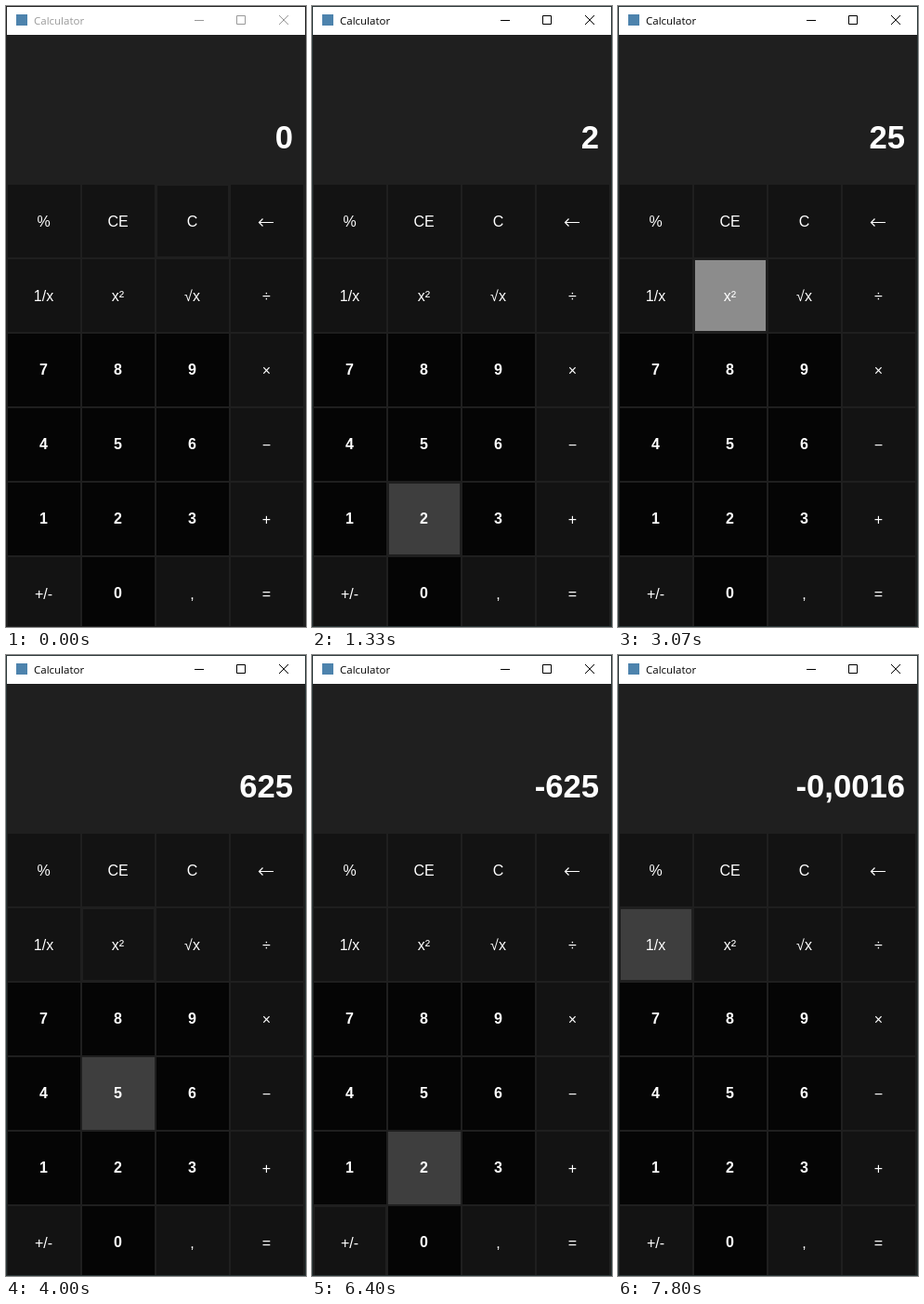
Recreate the animation shown at these times as an HTML page with a canvas. Size 323 px wide and 667 px high, loop 8 s.

```html
<!DOCTYPE html>
<html lang="en">
<head>
<meta charset="utf-8">
<title>Calculator</title>
<style>
  html, body { margin: 0; width: 323px; height: 667px; overflow: hidden; }
  canvas { display: block; }
</style>
</head>
<body>
<canvas id="stage" width="323" height="667"></canvas>
<script>
const ctx = document.getElementById('stage').getContext('2d');
const LOOP = 8000, PITCH = 80, KEY = 78, TOP = 192;
const BACK = '#1f1f1f';
const KEYS = ['%', 'CE', 'C', '←', '1/x', 'x²', '√x', '÷', '7', '8', '9', '×',
              '4', '5', '6', '−', '1', '2', '3', '+', '+/-', '0', ',', '='];

// Each track lists [start time, value]; a value holds until the next entry.
const hover = [[0, ''], [670, '0'], [1000, '2'], [1800, '5'], [2400, '8'], [2800, 'x²'],
               [3600, '8'], [3870, '5'], [4130, '4'], [4270, '1'], [4670, '+/-'],
               [6000, '0'], [6200, '2'], [6530, '5'], [6930, '8'], [7270, '7'], [7470, '1/x']];
const clicks = [
  { key: '2', down: 1130, up: 1330, result: '2' },
  { key: '5', down: 2000, up: 2200, result: '25' },
  { key: 'x²', down: 3070, up: 3270, result: '625' },
  { key: '+/-', down: 5000, up: 5200, result: '-625' },
  { key: '1/x', down: 7670, up: 7800, result: '-0,0016' }
];
const focus = [[0, 'C'], ...clicks.map(c => [c.down, c.key])];
const display = [[0, '0'], ...clicks.map(c => [c.up, c.result])];

const valueAt = (track, t) => track.filter(([start]) => start <= t).pop()[1];

function rect(color, x, y, w, h) {
  ctx.fillStyle = color;
  ctx.fillRect(x, y, w, h);
}

function text(str, x, y, font, color, align) {
  ctx.font = font;
  ctx.fillStyle = color;
  ctx.textAlign = align;
  ctx.fillText(str, x, y);
}

function stroke(path, color, width = 1) {
  ctx.strokeStyle = color;
  ctx.lineWidth = width;
  ctx.stroke(new Path2D(path));
}

function drawTitleBar(active) {
  const color = active ? '#000' : '#999';
  rect('#fff', 1, 1, 321, 30);
  rect('#4d83ad', 11, 9, 12, 12);
  text('Calculator', 30, 20, '11.5px "Open Sans", sans-serif', color, 'left');
  stroke('M203 15.5h10M248.5 10.5h9v9h-9zM294 10l10 10M304 10l-10 10', color);
}

function drawKey(label, i, state) {
  const x = 2 + i % 4 * PITCH, y = TOP + Math.floor(i / 4) * PITCH;
  const digit = /^\d$/.test(label);
  const inset = label === state.focus ? 1 : 0;
  const color = label === state.pressed ? '#8c8c8c'
    : label === state.hover ? '#3e3e3e'
    : digit ? '#050505' : '#131313';
  rect(color, x + inset, y + inset, KEY - 2 * inset, KEY - 2 * inset);
  if (label === '←') {
    stroke(`M${x + 30.5} ${y + 40.5}h15.5m-11.5 -4l-4 4l4 4`, '#fff', 1.2);
  } else {
    const font = (digit ? 'bold ' : '') + '16px "Liberation Sans", Arial, sans-serif';
    text(label, x + 38.5, y + (digit ? 44 : 45), font, '#fff', 'center');
  }
}

function draw(t) {
  const click = clicks.find(c => c.down <= t && t < c.up);
  const state = { hover: valueAt(hover, t), focus: valueAt(focus, t), pressed: click && click.key };
  rect(BACK, 0, 0, 323, 667);
  drawTitleBar(t >= clicks[0].down);
  text(valueAt(display, t), 309, 153, 'bold 34.67px "Liberation Sans", Arial, sans-serif', '#fff', 'right');
  KEYS.forEach((label, i) => drawKey(label, i, state));
  ctx.strokeStyle = t < 270 ? '#222' : '#2b3738';
  ctx.lineWidth = 1;
  ctx.strokeRect(0.5, 0.5, 322, 666);
}

function tick() {
  draw(performance.now() % LOOP);
  requestAnimationFrame(tick);
}
tick();
</script>
</body>
</html>
```
